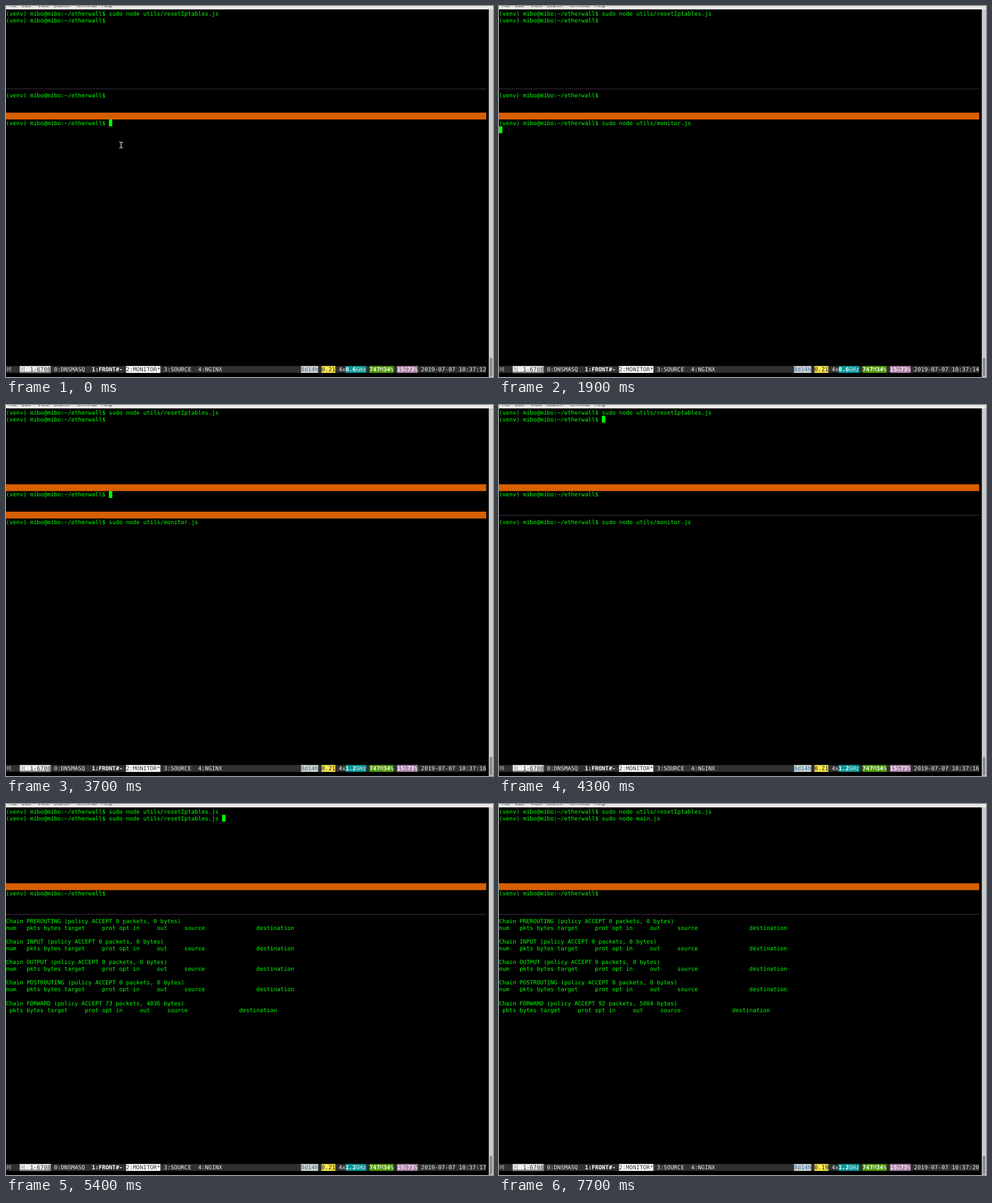
An HTML page that plays this animation: 857 px wide and 654 px high, repeating every 8 s.

```html
<!DOCTYPE html>
<html lang="en">
<head>
<meta charset="utf-8">
<title>Terminal session</title>
<style>
  html, body { margin: 0; width: 100%; height: 100%; overflow: hidden; background: #000; }
  svg { display: block; background: #000; }
  text { white-space: pre; text-rendering: geometricPrecision; }
  /* The size makes every glyph exactly 10 units wide. */
  #screen text { font: 16.61px "DejaVu Sans Mono", monospace; }
  #screen .bold { font-weight: bold; }
  #screen .icon { font-family: "Noto Sans CJK JP", "Noto Sans CJK SC", sans-serif; }
  #screen .link { text-decoration: underline; }
  #menu text { font: 9px "Noto Sans", sans-serif; fill: #3a3a3a; }
  #pointer { fill: none; stroke: #e8e8e8; stroke-width: 1.2; }
</style>
</head>
<body>
<svg width="857" height="654" viewBox="0 0 857 654">
  <g id="menu">
    <rect width="857" height="6" fill="#e9e8e7"/>
    <text x="5" y="2">File</text>
    <text x="28" y="2">Edit</text>
    <text x="56" y="2">View</text>
    <text x="84" y="2">Search</text>
    <text x="123" y="2">Terminal</text>
    <text x="168" y="2">Help</text>
  </g>
  <rect x="849.6" y="6" width="7.4" height="648" fill="#cbcbcb"/>
  <rect x="851.5" y="620" width="4" height="33" rx="2" fill="#828586"/>
  <g id="screen" transform="translate(0 6.9) scale(.6036)"></g>
  <path id="pointer" transform="translate(198 239)"
    d="M1 1H3.5L4.5 2L5.5 1H8M4.5 2V10M1 11H3.5L4.5 10L5.5 11H8"/>
</svg>
<script>
const LOOP = 8000, COL = 10, ROW = 20, BASE = 16, COLS = 140, STATUS = 52;
const GREEN = "#0f0", LIGHT = "#eee", DARK = "#303030";
const screen = document.getElementById("screen");
const pointer = document.getElementById("pointer");

function add(name, attrs, text = "") {
  const el = document.createElementNS("http://www.w3.org/2000/svg", name);
  for (const key in attrs) el.setAttribute(key, attrs[key]);
  el.textContent = text;
  screen.append(el);
}

function write(row, text, col = 0, fill = GREEN, style = "") {
  add("text", { x: col * COL, y: row * ROW + BASE, fill, class: style }, text);
}

function block(row, col, count, fill) {
  add("rect", { x: col * COL, y: row * ROW, width: count * COL, height: ROW, fill });
}

function border(row, hot) {
  if (hot) block(row, 0, COLS, "#d75f00");
  else add("rect", { y: row * ROW + 10, width: COLS * COL, height: 1, fill: "#75507b" });
}

const PROMPT = "(venv) mibo@mibo:~/etherwall$ ";
const RESET = "sudo node utils/resetIptables.js";
const MONITOR = "sudo node utils/monitor.js";
const HEAD = " pkts bytes target     prot opt in     out     source               destination";

const start = {
  cursor: [16, 30], command: "", monitor: "", chains: null, pointer: true,
  hot: [false, true], sec: 12, ghz: "0.6", load: "0.21"
};

const steps = [
  [0, {}],
  [200, { cursor: null }],
  [600, { sec: 13 }],
  [800, { cursor: [16, 30] }],
  [900, { cursor: [16, 57], monitor: MONITOR, pointer: false }],
  [1400, { cursor: null }],
  [1600, { sec: 14 }],
  [1900, { cursor: [17, 0] }],
  [2900, { cursor: null, sec: 15 }],
  [3200, { cursor: [17, 0] }],
  [3700, { cursor: [12, 30], hot: [true, true], sec: 16, ghz: "1.2" }],
  [4300, { cursor: [1, 30], hot: [true, false] }],
  [4500, { chains: [73, 4036] }],
  [4800, { cursor: null, sec: 17 }],
  [5400, { cursor: [1, 63], command: RESET }],
  [5600, { sec: 18 }],
  [5900, { cursor: [1, 48], command: "sudo node main.js", load: "0.19" }],
  [6500, { cursor: null, chains: [92, 5004] }],
  [6800, { sec: 19 }],
  [7100, { cursor: [2, 0] }],
  [7700, { cursor: null, sec: 20 }]
];

let last = start;
const states = steps.map(([at, change]) => [at, last = { ...last, ...change }]);

function drawStatus(s) {
  const back = (col, count, fill) => block(STATUS, col, count, fill);
  const put = (col, text, fill = LIGHT, style) => write(STATUS, text, col, fill, style);
  const bold = (col, text) => put(col, text, "#fff", "bold");

  back(0, COLS, DARK);
  put(0, "〣", LIGHT, "icon");
  back(4, 9, LIGHT);
  put(4, "〣", "#777", "icon");
  put(4, "   1-6708", DARK, "link");
  put(14, "0:DNSMASQ");
  bold(25, "1:FRONT#-");
  back(35, 10, "#fff");
  put(35, "2:MONITOR*", DARK);
  put(46, "3:SOURCE");
  put(56, "4:NGINX");

  back(86, 5, "#d3d7cf");
  put(86, "8d14h", "#3465a4");
  back(92, 4, "#fce94f");
  put(92, s.load, "#1c1c1c");
  put(97, "4x");
  back(99, 6, "#06989a");
  bold(99, s.ghz);
  put(102, "GHz");
  back(106, 7, "#4e9a06");
  bold(106, "747");
  put(109, "M");
  bold(110, "34");
  put(112, "%");
  back(114, 6, "#ad7fa8");
  bold(114, "15");
  put(116, "G");
  bold(117, "73");
  put(119, "%");
  put(121, "2019-07-07 10:37:" + s.sec);
}

function drawChains([packets, bytes]) {
  ["PREROUTING", "INPUT", "OUTPUT", "POSTROUTING"].forEach((name, i) => {
    write(16 + 3 * i, `Chain ${name} (policy ACCEPT 0 packets, 0 bytes)`);
    write(17 + 3 * i, "num  " + HEAD);
  });
  write(28, `Chain FORWARD (policy ACCEPT ${packets} packets, ${bytes} bytes)`);
  write(29, HEAD);
}

function draw(s) {
  screen.replaceChildren();
  border(11, s.hot[0]);
  border(15, s.hot[1]);
  write(0, PROMPT + RESET);
  write(1, PROMPT + s.command);
  write(12, PROMPT);
  if (s.chains) drawChains(s.chains);
  else write(16, PROMPT + s.monitor);
  if (s.cursor) block(...s.cursor, 1, GREEN);
  drawStatus(s);
  pointer.style.display = s.pointer ? "" : "none";
}

let shown = null;
const origin = performance.now();
function tick() {
  const t = (performance.now() - origin) % LOOP;
  const state = states.findLast(([at]) => at <= t)[1];
  if (state !== shown) draw(shown = state);
  requestAnimationFrame(tick);
}
tick();
</script>
</body>
</html>
```
